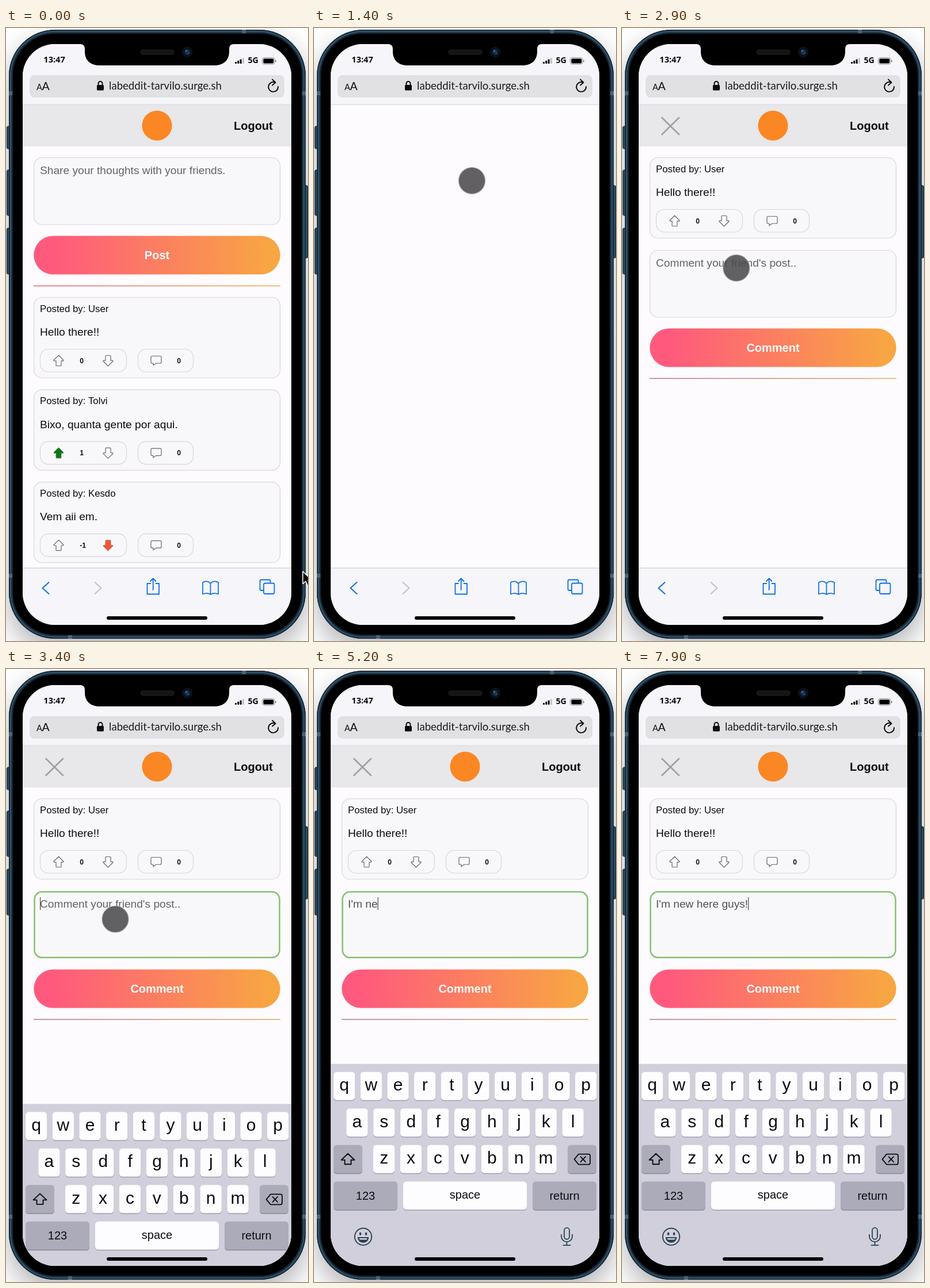
Recreate the animation shown at these times as an HTML page with a canvas. Size 525x1066 px, loop 8 s.

```html
<!DOCTYPE html>
<html lang="en">
<head>
<meta charset="utf-8">
<title>Phone demo</title>
<style>
html, body { margin: 0; width: 100%; height: 100%; overflow: hidden; background: #fff; }
canvas { display: block; width: 525px; height: 1066px; }
</style>
</head>
<body>
<canvas id="stage" width="525" height="1066"></canvas>
<script>
const g = document.getElementById('stage').getContext('2d');
const LOOP = 8000, STEP = 100;
const ARIAL = '"Liberation Sans", Arial, sans-serif';
const LATO = 'Lato, sans-serif';
const BLUE = '#0b70e4', CHROME = '#f6f5f9', PAGE = '#fdfbfe', CARD = '#f8f7fa', LINE = '#d7d6da';
const MESSAGE = "I'm new here guys!";
const OPEN_AT = 1100, LOADED_AT = 1900, FOCUS_AT = 3200, TYPE_AT = 4120, TYPE_GAP = 175;

function paint(fill, stroke, width = 1) {
  if (fill) { g.fillStyle = fill; g.fill(); }
  if (stroke) { g.strokeStyle = stroke; g.lineWidth = width; g.stroke(); }
}
function box(x, y, w, h, r, fill, stroke, width) {
  g.beginPath();
  g.roundRect(x, y, w, h, r);
  paint(fill, stroke, width);
}
function disc(x, y, r, fill, stroke, width) {
  g.beginPath();
  g.arc(x, y, r, 0, Math.PI * 2);
  paint(fill, stroke, width);
}
function path(d, stroke, width, fill) {
  const p = new Path2D(d);
  if (fill) { g.fillStyle = fill; g.fill(p); }
  if (stroke) { g.strokeStyle = stroke; g.lineWidth = width; g.stroke(p); }
}
function text(s, x, y, size, { color = '#0c0c0e', weight = 400, align = 'left', family = ARIAL } = {}) {
  g.font = `${weight} ${size}px ${family}`;
  g.textAlign = align;
  g.fillStyle = color;
  g.fillText(s, x, y);
}
function at(x, y, draw) {
  g.save();
  g.translate(x, y);
  draw();
  g.restore();
}
function across(from, to) {
  const fade = g.createLinearGradient(48, 0, 477, 0);
  fade.addColorStop(0.08, from);
  fade.addColorStop(0.95, to);
  return fade;
}

// Device

function drawBody() {
  g.fillStyle = '#fff';
  g.fillRect(0, 0, 525, 1066);
  g.save();
  g.shadowColor = 'rgba(20,20,30,.32)';
  g.shadowBlur = 46;
  g.shadowOffsetY = 20;
  box(5, 3, 516, 1059, 80, '#1d3547');
  g.restore();
  for (const [y, h] of [[171, 39], [247, 79], [348, 80]]) box(1.5, y, 6, h, 2, '#2b4b61', '#14242f');
  box(519, 274, 5.5, 126, 2, '#2b4b61', '#14242f');
  box(5.5, 3.5, 515, 1058, 79.5, '#1d3547', '#10212e');
  box(8, 6, 510, 1053, 77, null, '#3b5b72', 1.5);
  box(11.5, 9.5, 503, 1046, 73.5, '#000', '#0d1e2b', 1.5);
  g.fillStyle = '#4a6376';
  for (const [x, y, w, h] of [[410, 3, 7, 6], [108, 1056, 7, 6], [5, 110, 6, 7], [515, 110, 6, 7], [5, 949, 6, 7], [515, 949, 6, 7]])
    g.fillRect(x, y, w, h);
}

function drawNotch() {
  path('M129 27V28C135 28.5 137 31 137 37V41C137 56 147 65 162 65H363C378 65 388 56 388 41V37C388 31 390 28.5 396 28V27Z', null, 0, '#000');
  box(234, 38, 58, 8, 4, '#151417', '#222126');
  disc(315, 42, 8.5, '#0b1017', '#141a24');
  disc(315, 42, 5, '#142c4a');
  disc(313.5, 40, 1.8, '#356a9c');
  disc(317, 44, 1.5, '#24566a');
}

function drawBrowserTop() {
  g.fillStyle = CHROME;
  g.fillRect(29, 27, 467, 106);
  g.fillStyle = '#dedde1';
  g.fillRect(29, 132.5, 467, 1.5);
  const bold = { weight: 700, family: '"Open Sans", sans-serif' };
  text('13:47', 65.3, 59.5, 14.6, bold);
  text('5G', 420.5, 61, 14.2, bold);
  for (let i = 0; i < 4; i++)
    box(398 + i * 4.3, 59 - i * 2.3, 3, 3 + i * 2.3, 0.8, i < 3 ? '#0c0c0e' : '#c4c3c7');
  box(445.5, 51.5, 21.5, 11.5, 3.5, null, '#8c8b90');
  box(447.3, 53.2, 18, 8.2, 2, '#000');
  box(468, 55.5, 1.6, 4, 1, '#8c8b90');

  box(41, 82, 443, 39, 8.5, '#e1e0e3');
  text('A', 53, 107.5, 14.5, { family: LATO });
  text('A', 62.5, 107.5, 19.5, { family: LATO });
  path('M160.5 100V96.5A3.5 3.5 0 0 1 167.5 96.5V100', '#0c0c0e', 2);
  box(158, 99, 12, 9.5, 1.5, '#0c0c0e');
  text('labeddit-tarvilo.surge.sh', 179, 107.3, 18.6, { color: '#1c1c1f', family: LATO });
  path('M467.5 94.6A8.4 8.4 0 1 0 473 102M463 89.5L468.5 94.8L463 99.5', '#0c0c0e', 1.9);
}

function drawToolbar() {
  g.fillStyle = CHROME;
  g.fillRect(29, 939, 467, 100);
  g.fillStyle = '#d0cfd4';
  g.fillRect(29, 938.5, 467, 1.3);
  path('M74.5 964L63.5 974L74.5 984', BLUE, 2);
  path('M154.5 964L165.5 974L154.5 984', '#c3c2c7', 2);
  path('M251 966H245.5V984.5H266V966H260.5M255.7 977V957.5M251 962L255.7 957.2L260.5 962', BLUE, 1.8);
  path('M355.5 966C352 961.5 346 961.5 342 964V984.5C346 982.5 352 982.5 355.5 985C359 982.5 365 982.5 369 984.5V964C365 961.5 359 961.5 355.5 966V985', BLUE, 1.7);
  path('M447 978H443.5Q441.5 978 441.5 976V961.5Q441.5 959.5 443.5 959.5H457.5Q459.5 959.5 459.5 961.5V965', BLUE, 1.8);
  box(448, 965.5, 18.5, 18.5, 2.5, null, BLUE, 1.8);
}

// Page parts

function drawHeader(closable) {
  g.fillStyle = '#e8e7e9';
  g.fillRect(29, 134, 467, 72);
  disc(262.5, 169.7, 26, '#fb8624');
  text('Logout', 396, 177, 20, { weight: 700 });
  if (closable) path('M69.5 156L99 185M99 156L69.5 185', '#a2a1a4', 2.8);
}

function drawArrow(x, y, down, fill) {
  at(x, y, () => {
    if (down) g.scale(1, -1);
    path('M0 -9.3L8.4 -1Q8.8 0 7.6 .3H4.5V8Q4.5 9 3.5 9H-3.5Q-4.5 9 -4.5 8V.3H-7.6Q-8.8 0 -8.4 -1Z', fill ? '#66705f' : '#69686c', fill ? 0.7 : 1.2, fill);
  });
}

function drawPost(y, author, body, votes) {
  at(0, y, () => {
    box(48.5, 0.5, 428, 140, 14, CARD, LINE, 1.2);
    text(`Posted by: ${author}`, 59, 25.8, 16.8);
    text(body, 59, 66.9, 19.16);
    box(59.5, 90.5, 150, 39.5, 14, CARD, LINE, 1.2);
    box(229.5, 90.5, 96, 39.5, 14, CARD, LINE, 1.2);
    drawArrow(91.5, 110.5, false, votes > 0 && '#08790f');
    drawArrow(177.5, 110.5, true, votes < 0 && '#fa532e');
    const count = { weight: 700, align: 'center' };
    text(votes, votes < 0 ? 133.5 : 131.5, 114.7, 12, count);
    text('0', 300.5, 114.7, 12, count);
    path('M254 102.5H268Q270 102.5 270 104.5V113Q270 115 268 115H261L256 118.5V115H254Q252 115 252 113V104.5Q252 102.5 254 102.5Z', '#69686c', 1.2);
  });
}

function drawComposer(y, label, content, focused, color, rule) {
  at(0, y, () => {
    if (focused) box(49.5, 1.5, 426, 114.3, 13, CARD, '#83c26d', 2.5);
    else box(48.5, 0.5, 428, 116.5, 14, CARD, LINE, 1.2);
    text(content, 59, 29, 19.16, { color });
    box(48.3, 136.5, 428.4, 67, 33.5, across('#ff5a7d', '#f8a543'));
    text(label, 262.5, 177, 20, { color: '#fff', weight: 700, align: 'center' });
    g.fillStyle = across(...rule);
    g.fillRect(48, 222.7, 429, 1.5);
  });
}

function drawFeed() {
  drawHeader(false);
  drawComposer(225, 'Post', 'Share your thoughts with your friends.', false, '#646367', ['#e4627c', '#f5a550']);
  drawPost(468, 'User', 'Hello there!!', 0);
  drawPost(628.6, 'Tolvi', 'Bixo, quanta gente por aqui.', 1);
  drawPost(789.2, 'Kesdo', 'Vem aii em.', -1);
}

function drawThread(t) {
  const focused = t >= FOCUS_AT;
  const typed = MESSAGE.slice(0, Math.max(0, Math.floor((t - TYPE_AT) / TYPE_GAP)));
  drawHeader(true);
  drawPost(225, 'User', 'Hello there!!', 0);
  drawComposer(386, 'Comment', typed || "Comment your friend's post..", focused, typed ? '#525155' : '#646367', ['#b0748e', '#d2ac62']);
  if (focused) {
    g.font = `19.16px ${ARIAL}`;
    g.fillStyle = '#4b4a4e';
    g.fillRect(59 + g.measureText(typed).width, 397, 1.2, 22);
  }
}

// Keyboard

function drawKey(x, y, w, label, size, dark) {
  box(x, y + 1.5, w, 49, 5.5, dark ? '#8b8a98' : '#a09fab');
  box(x, y, w, 49, 5.5, dark ? '#acabba' : '#fdfcfe');
  if (label) text(label, x + w / 2, y + (size > 25 ? 32.5 : dark ? 31.5 : 30), size, { align: 'center' });
}

function drawKeyboard(top) {
  at(0, top, () => {
    g.fillStyle = '#d0cfdb';
    g.fillRect(29, 0, 467, 360);
    [['qwertyuiop', 34, 14, 46.67], ['asdfghjkl', 56.3, 77.5, 46.9], ['zxcvbnm', 103, 141, 46.9]].forEach(([keys, x, y, pitch]) => {
      [...keys].forEach((key, i) => drawKey(x + i * pitch, y, 37.3, key, 30));
    });
    drawKey(34, 141, 50, '', 0, true);
    drawKey(441, 141, 50, '', 0, true);
    path('M59 156L70.5 167H64.5V174.5H53.5V167H47.5Z', '#0c0c0e', 1.9);
    path('M460 157H477Q480 157 480 160V172Q480 175 477 175H460L452.5 166ZM463.5 161.5L472 170.5M472 161.5L463.5 170.5', '#0c0c0e', 1.8);
    drawKey(34, 204.5, 111, '123', 20, true);
    drawKey(155, 204.5, 215, 'space', 20);
    drawKey(380, 204.5, 111, 'return', 20, true);

    const ink = '#2c4254';
    disc(85.5, 300.5, 14.7, null, ink, 1.9);
    g.fillStyle = ink;
    for (const x of [80.5, 90.5]) {
      g.beginPath();
      g.ellipse(x, 295.5, 1.8, 2.8, 0, 0, Math.PI * 2);
      g.fill();
    }
    path('M76.5 302H94.5A9 8.5 0 0 1 76.5 302Z', ink, 1.3, ink);
    path('M78.5 303.3H92.5L91.5 305.5H79.5Z', null, 0, '#e5e4ec');
    box(435, 285, 9, 20, 4.5, null, ink, 1.8);
    path('M430 297V300A9.5 9.5 0 0 0 449 300V297M439.5 310V315.5M433.5 315.5H445.5', ink, 1.8);
  });
}

// Pointer: time, x, y
const ROUTE = [[100, 516, 945], [700, 300, 535], [1100, 300, 535], [1400, 274.5, 265.5],
  [2500, 274.5, 265.5], [3000, 190, 435], [LOOP, 190, 435]];

function pointerAt(t) {
  const next = ROUTE.findIndex(stop => stop[0] > t);
  if (next < 1) return ROUTE[0].slice(1);
  const [t0, x0, y0] = ROUTE[next - 1], [t1, x1, y1] = ROUTE[next];
  const u = (t - t0) / (t1 - t0), k = u * u * (3 - 2 * u);
  return [x0 + (x1 - x0) * k, y0 + (y1 - y0) * k];
}

function drawPointer(t) {
  if (t >= TYPE_AT + TYPE_GAP) return;
  const [x, y] = pointerAt(t);
  if (x < 496) disc(x, y, 23, 'rgba(75,74,76,.87)', 'rgba(165,164,166,.9)', 1.2);
  else at(x, y, () => path('M0 0V21.5L5 17L8.5 25L12.5 23.2L9 15.5H16Z', '#fff', 1.5, '#000'));
}

function drawScene(t) {
  drawBody();
  g.save();
  g.beginPath();
  g.roundRect(29, 28, 467, 1010, 56);
  g.clip();
  g.fillStyle = PAGE;
  g.fillRect(29, 27, 467, 1012);
  if (t < OPEN_AT) drawFeed();
  else if (t >= LOADED_AT) drawThread(t);
  drawBrowserTop();
  drawToolbar();
  if (t >= FOCUS_AT) {
    const left = Math.max(0, 1 - (t - FOCUS_AT) / 480);
    drawKeyboard(686.7 + 351 * left ** 3);
  }
  box(175, 1023, 175, 6, 3, '#000');
  g.restore();
  drawNotch();
  drawPointer(t);
}

g.lineJoin = 'round';
g.lineCap = 'round';
const start = performance.now();
function tick(now) {
  const t = Math.max(0, now - start) % LOOP;
  drawScene(Math.floor(t / STEP) * STEP);
  requestAnimationFrame(tick);
}
drawScene(0);
requestAnimationFrame(tick);
</script>
</body>
</html>
```
